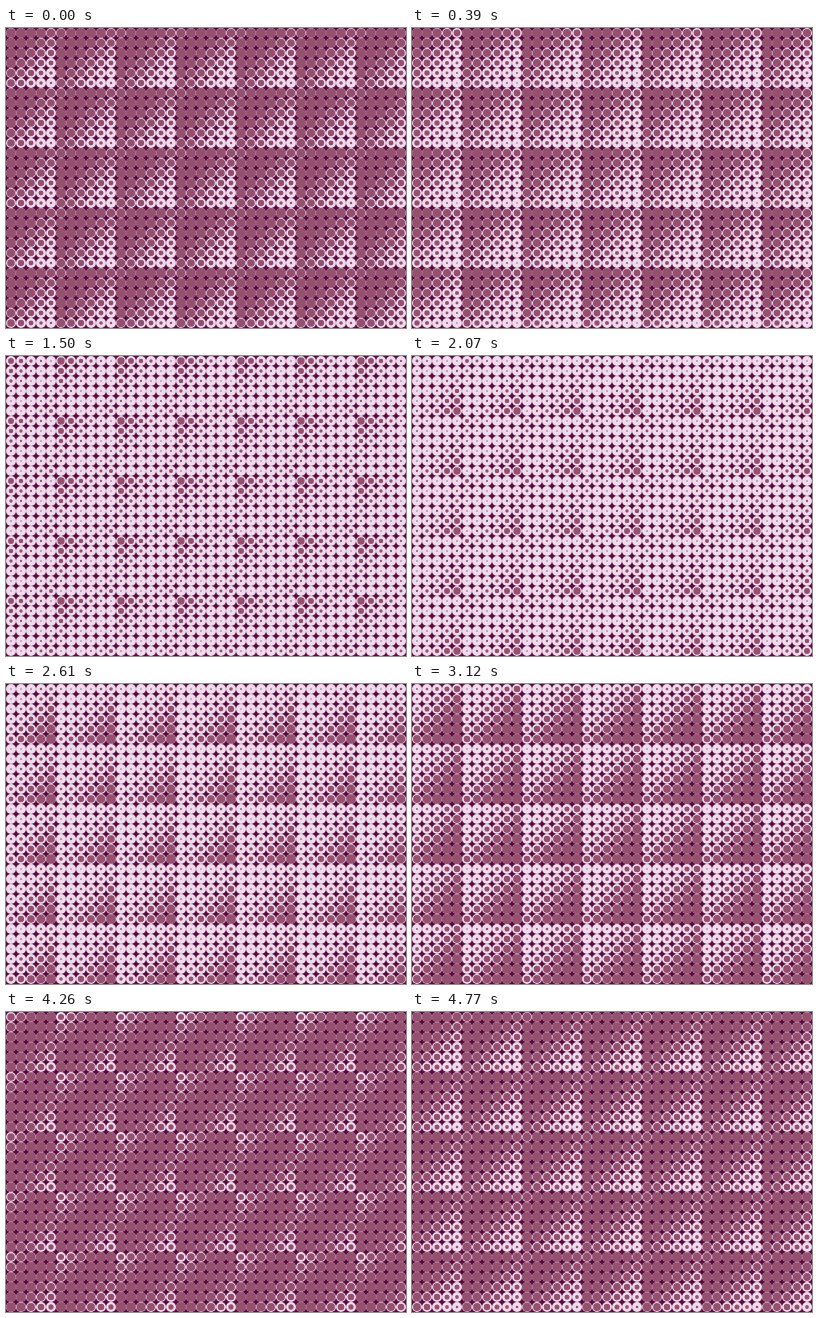
An HTML page without scripts that plays this animation: 400x300 px, repeating every 4.8 s.

```html
<!DOCTYPE html>
<html lang="en">
<head>
<meta charset="utf-8">
<title>Halftone wave</title>
<style>
  html, body { margin: 0; width: 100%; height: 100%; overflow: hidden; background: #5a0c3a; }
  svg { display: block; width: 400px; height: 300px; }

  /* Each diagonal of a tile is one path of round dots, 240 ms ahead of the previous one. */
  .wave path {
    fill: none;
    stroke: #955070;
    stroke-linecap: round;
    animation: shrink 2400ms cubic-bezier(.364, 0, .636, 1) infinite alternate;
    animation-delay: calc(-4215ms - var(--d) * 240ms);
  }
  @keyframes shrink {
    from { stroke-width: 10.1px; }
    to { stroke-width: 1.3px; }
  }
</style>
</head>
<body>
<svg viewBox="0 0 400 300">
  <defs>
    <pattern id="discs" width="10" height="10" patternUnits="userSpaceOnUse">
      <circle cx="5" cy="5" r="5" fill="#efdbee"/>
    </pattern>
    <pattern id="tile" x="-10" width="60" height="60" patternUnits="userSpaceOnUse">
      <g class="wave">
        <path style="--d:0" d="M5 5h0"/>
        <path style="--d:1" d="M15 5h0m-10 10h0"/>
        <path style="--d:2" d="M25 5h0m-10 10h0m-10 10h0"/>
        <path style="--d:3" d="M35 5h0m-10 10h0m-10 10h0m-10 10h0"/>
        <path style="--d:4" d="M45 5h0m-10 10h0m-10 10h0m-10 10h0m-10 10h0"/>
        <path style="--d:5" d="M55 5h0m-10 10h0m-10 10h0m-10 10h0m-10 10h0m-10 10h0"/>
        <path style="--d:6" d="M55 15h0m-10 10h0m-10 10h0m-10 10h0m-10 10h0"/>
        <path style="--d:7" d="M55 25h0m-10 10h0m-10 10h0m-10 10h0"/>
        <path style="--d:8" d="M55 35h0m-10 10h0m-10 10h0"/>
        <path style="--d:9" d="M55 45h0m-10 10h0"/>
        <path style="--d:10" d="M55 55h0"/>
      </g>
    </pattern>
  </defs>
  <rect width="400" height="300" fill="#5a0c3a"/>
  <rect width="400" height="300" fill="url(#discs)"/>
  <rect width="400" height="300" fill="url(#tile)"/>
</svg>
</body>
</html>
```
